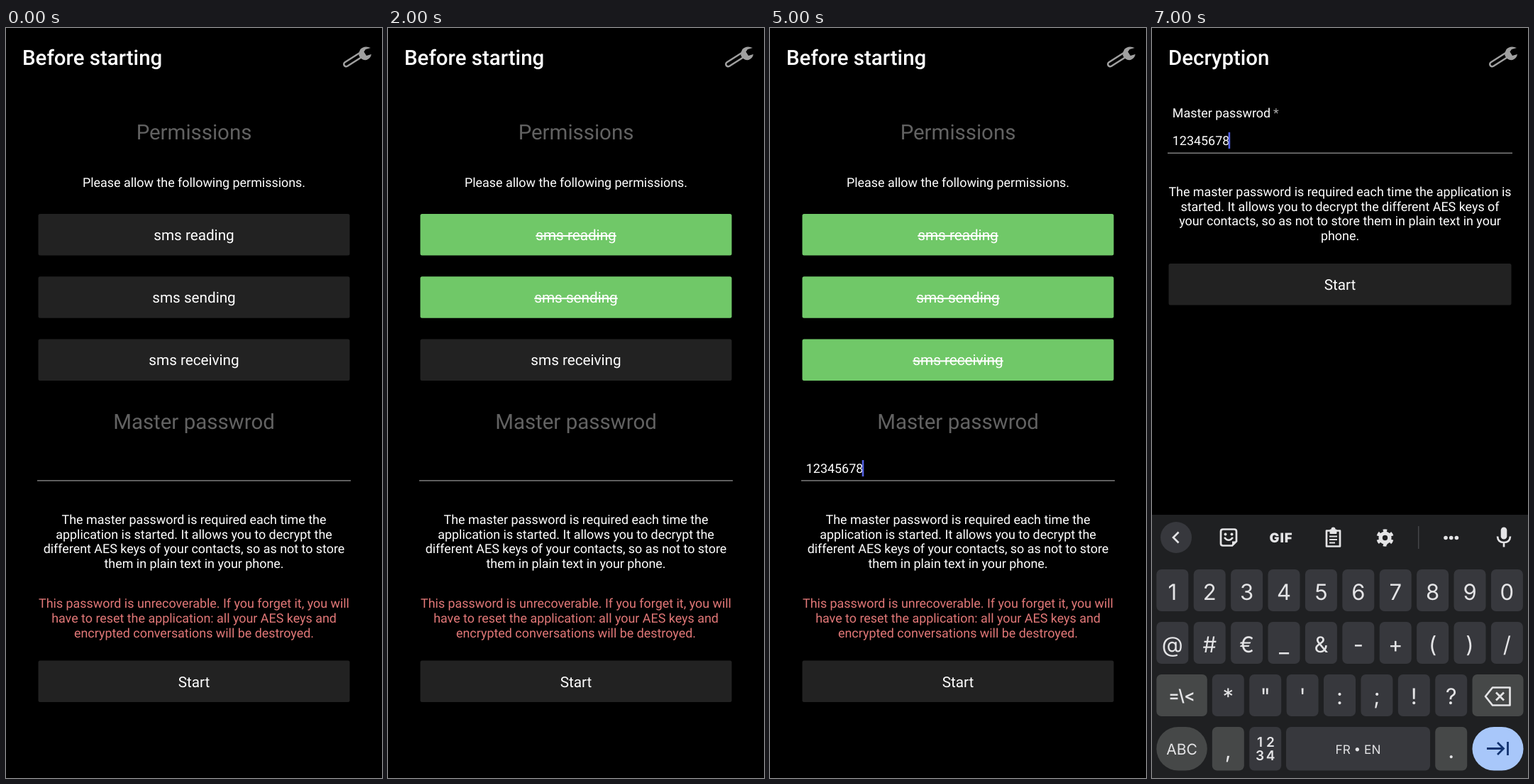
These frames come from a looping animation (530x1057 px, 8000 ms). An HTML page:

```html
<!DOCTYPE html>
<html lang="en">
<head>
<meta charset="utf-8">
<title>Master password setup</title>
<style>
  html, body { margin: 0; width: 100%; height: 100%; overflow: hidden; background: #000; }
  svg { display: block; width: 100vw; height: 100vh; text-rendering: geometricPrecision; }
  text { font-family: Roboto, sans-serif; font-size: 17.9px; fill: #fff; white-space: pre; }
  .mid { text-anchor: middle; }
  .title { font-size: 29.44px; font-weight: 500; }
  .heading { font-size: 29.44px; fill: #626262; }
  .label { font-size: 20.7px; }
  .done { text-decoration: line-through 1px; }
  .warn { fill: #e27878; }
  .key { font-family: Inter, Roboto, sans-serif; font-size: 31px; fill: #e4e4e6; }
  .small { font-size: 21px; }
  .shift { font-size: 23px; font-weight: 600; }
  .tiny { font-size: 17.2px; }
  .digit { font-size: 19px; font-weight: 600; }
  .bold { font-size: 18.5px; font-weight: 900; letter-spacing: 1px; }
  .line { fill: none; stroke: #e4e4e6; stroke-width: 2.7; }
  .solid { fill: #e4e4e6; }
</style>
</head>
<body>
<svg id="stage" viewBox="0 0 530 1057" preserveAspectRatio="none"></svg>
<script>
const stage = document.getElementById('stage');
const STEP = 1000, STEPS = 8;
const DARK = '#222', GREEN = '#70c868', RED = '#482222';
const KEY = '#37383d', ALT = '#464848', LINE_HEIGHT = 20.7;
const PASSWORD = '12345678';

const esc = s => s.replace(/&/g, '&amp;').replace(/</g, '&lt;');
const text = (s, x, y, cls = '') => `<text x="${x}" y="${y}" class="${cls}">${esc(s)}</text>`;
const mid = (s, y, cls = '', x = 265) => text(s, x, y, 'mid ' + cls);
const rect = (x, y, w, h, fill, r = 0) =>
  `<rect x="${x}" y="${y}" width="${w}" height="${h}" rx="${r}" fill="${fill}"/>`;
const path = (d, attrs = 'class="line"') => `<path d="${d}" ${attrs}/>`;
const dot = (x, y, r, attrs = 'class="solid"') => `<circle cx="${x}" cy="${y}" r="${r}" ${attrs}/>`;
const lines = (list, y, cls) => list.map((s, i) => mid(s, y + i * LINE_HEIGHT, cls)).join('');
const button = (s, x, y, fill = DARK, cls = '') =>
  rect(x, y, 530 - 2 * x, 58.5, fill, 2.5) + mid(s, y + 37, 'label ' + cls);
const underline = (x, y) => rect(x, y, 530 - 2 * x, 1.4, '#858585');
const caret = (x, y) => rect(x, y, 2.6, 23, '#5260e0');

const header = title => text(title, 23, 52, 'title') +
  path('M479.5 51 L500 38', 'stroke="#a0a0a0" stroke-width="9" stroke-linecap="round"') +
  path('M479.5 51 L498 39.3', 'stroke="#000" stroke-width="4" stroke-linecap="round"') +
  path('M514 28 Q505 24 499.5 30 Q497 34 497.5 39 Q501 46 508 45 Q514 43 515 37 L508 39 L504.5 33.5 L507 30 Z',
    'fill="#a0a0a0"');

function setupScreen(granted, password, focused) {
  const permissions = ['reading', 'sending', 'receiving'].map((name, i) => {
    const done = i < granted;
    return button('sms ' + name, 45.5, 262 + i * 88.2, done ? GREEN : DARK, done ? 'done' : '');
  }).join('');
  return header('Before starting') +
    mid('Permissions', 157, 'heading') +
    mid('Please allow the following permissions.', 224.3) +
    permissions +
    mid('Master passwrod', 565, 'heading') +
    text(password, 50.8, 626.5) + (focused ? caret(129.7, 609) : '') +
    underline(44, 637.2) +
    lines(['The master password is required each time the',
      'application is started. It allows you to decrypt the',
      'different AES keys of your contacts, so as not to store',
      'them in plain text in your phone.'], 699, '') +
    lines(['This password is unrecoverable. If you forget it, you will',
      'have to reset the application: all your AES keys and',
      'encrypted conversations will be destroyed.'], 817.4, 'warn') +
    button('Start', 45.5, 891.5);
}

function unlockScreen(password) {
  return header('Decryption') +
    text('Master passwrod', 28.8, 126) +
    '<g opacity=".65">' + text('*', 171, 126) + '</g>' +
    text(password, 28.8, 165) + (password && caret(107.6, 147)) +
    underline(22, 175.6) +
    lines(['The master password is required each time the application is',
      'started. It allows you to decrypt the different AES keys of',
      'your contacts, so as not to store them in plain text in your',
      'phone.'], 237, '') +
    button('Start', 23.5, 332) +
    lines(['This password is unrecoverable. If you forget it, you will have',
      'to reset the application: all your AES keys and encrypted',
      'conversations will be destroyed.'], 899, 'warn') +
    button('Reset', 23.5, 972.8, RED);
}

function toolbar() {
  return dot(34, 718, 22, `fill="${KEY}"`) + path('M37.5 710.5 L30 718 L37.5 725.5') +
    // sticker
    path('M113 729.5 H100 Q97 729.5 97 726.5 V709.5 Q97 706.5 100 706.5 H116 Q119 706.5 119 709.5 V723.5 Z') +
    path('M113 729 V723.5 H119 Z', 'class="solid"') +
    dot(103.5, 713.5, 2) + dot(112.5, 713.5, 2) + path('M102 718 Q108 725.5 114 718') +
    mid('GIF', 725, 'key bold', 182) +
    // clipboard
    path('M246 708.5 H265 V730.5 H246 Z', 'class="line" stroke-linejoin="round"') +
    rect(250.5, 706.5, 10, 6.5, '#e4e4e6', 1) + dot(255.5, 706.5, 3) +
    path('M250 716.5 H261 M250 721 H261 M250 725.5 H258', 'class="line" style="stroke-width:2"') +
    // gear
    '<g transform="translate(328.5 718.5)">' +
    '<circle r="6.4" fill="none" stroke="#e4e4e6" stroke-width="5.4"/>' +
    '<circle r="10.2" fill="none" stroke="#e4e4e6" stroke-width="4" pathLength="12" stroke-dasharray="1 1" transform="rotate(-105)"/></g>' +
    rect(375, 702, 1.4, 32, '#46474a') +
    [414, 421.7, 429.4].map(x => dot(x, 718.5, 2.8)).join('') +
    // microphone
    rect(491.7, 703.5, 8.6, 17, '#e4e4e6', 4.3) +
    path('M487 716.5 Q487.5 725 496 725 Q504.5 725 505 716.5 M496 725 V731.5');
}

function keyRow(chars, x, y, base) {
  return [...chars].map((c, i) => {
    const left = x + i * 52.4;
    return rect(left, y, 45, 59, KEY, 7) + mid(c, base, 'key', left + 22.5);
  }).join('');
}

function keyboard() {
  return rect(0, 686, 530, 371, '#1f2022') + toolbar() +
    keyRow('1234567890', 6.3, 763, 805.7) +
    keyRow('@#€_&-+()/', 6.3, 837, 880) +
    rect(6.3, 911, 71.5, 59, ALT, 7) + mid('=\\<', 949, 'key shift', 42) +
    keyRow('*"\':;!?', 84.8, 911, 953) +
    rect(451.5, 911, 72, 59, ALT, 7) +
    path('M480 929.5 H504.5 V954.5 H480 L470 942 Z M485 936.5 L496 947.5 M496 936.5 L485 947.5',
      'class="line" stroke-linejoin="round"') +
    rect(6.3, 985, 71.5, 61.5, ALT, 30.7) + mid('ABC', 1024, 'key small', 42) +
    rect(84.8, 985, 45, 61.5, ALT, 7) + mid(',', 1029, 'key', 107.3) +
    rect(137.2, 985, 45, 61.5, KEY, 7) +
    [...'1234'].map((d, i) => mid(d, i < 2 ? 1013 : 1032, 'key digit', 152 + i % 2 * 15)).join('') +
    rect(189, 985, 203, 61.5, KEY, 7) + mid('FR • EN', 1023, 'key tiny', 290.5) +
    rect(399.2, 985, 45, 61.5, ALT, 7) + mid('.', 1029, 'key', 421.7) +
    rect(451.5, 985, 72, 61.5, '#a8c7fa', 30.7) +
    path('M472 1015.5 H495 M487 1007 L495.5 1015.5 L487 1024 M501.5 1006 V1025',
      'fill="none" stroke="#123370" stroke-width="2.8"');
}

function scene(step) {
  if (step < 4) return setupScreen(step, '', false);
  if (step === 4) return setupScreen(3, PASSWORD, false) + keyboard();
  if (step === 5) return setupScreen(3, PASSWORD, true);
  if (step === 6) return unlockScreen('');
  return unlockScreen(PASSWORD) + keyboard();
}

let shown = -1;
function tick() {
  const step = Math.floor(performance.now() / STEP) % STEPS;
  if (step !== shown) stage.innerHTML = scene(shown = step);
  requestAnimationFrame(tick);
}
tick();
</script>
</body>
</html>
```
